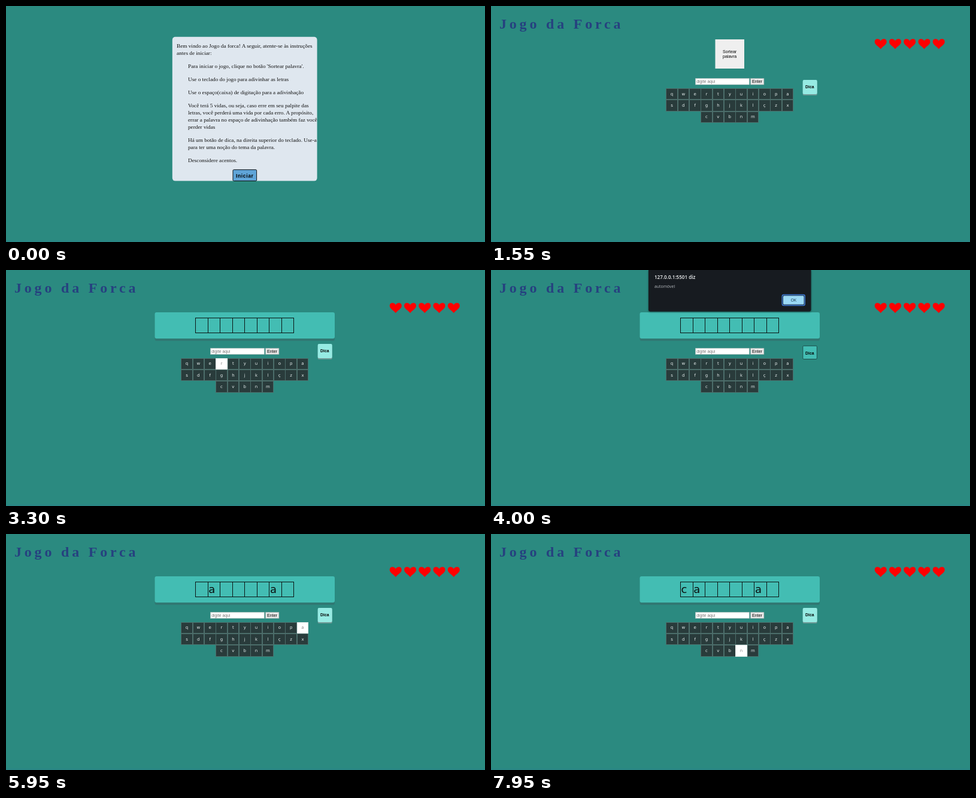
These frames come from a looping animation (800x396 px, 8000 ms). An HTML page:

```html
<!DOCTYPE html>
<html lang="pt">
<head>
<meta charset="utf-8">
<title>Jogo da Forca</title>
<style>
html, body { margin: 0; width: 100%; height: 100%; overflow: hidden; background: #2b8a80; }
svg { display: block; width: 800px; height: 396px; }
text { white-space: pre; }
.serif { font-family: "Liberation Serif", serif; }
.sans { font-family: "Liberation Sans", sans-serif; }
.wide { font-family: "DejaVu Sans", sans-serif; }
.ui { font-family: "Open Sans", sans-serif; }
.mid { text-anchor: middle; }
.bold { font-weight: 700; }
.crisp, .key rect { shape-rendering: crispEdges; }
.key rect { fill: #293b3b; stroke: #4c6d6a; stroke-width: 1; }
.key text { fill: #e6eeee; font-size: 7px; }
.key.on rect { fill: #fff; stroke: #e4e8e8; }
.key.on text { fill: #8a8a8a; }
</style>
</head>
<body>
<svg id="stage" viewBox="0 0 800 396" xmlns="http://www.w3.org/2000/svg"></svg>
<script>
const LOOP = 8000;
const stage = document.getElementById('stage');

function add(parent, tag, attrs, content) {
  const el = document.createElementNS('http://www.w3.org/2000/svg', tag);
  for (const name in attrs) el.setAttribute(name, attrs[name]);
  if (content) el.textContent = content;
  parent.appendChild(el);
  return el;
}
const group = (parent, attrs) => add(parent, 'g', attrs);
const box = (parent, x, y, width, height, fill, extra) =>
  add(parent, 'rect', { x, y, width, height, fill, ...extra });
const label = (parent, x, y, size, cls, content, extra) =>
  add(parent, 'text', { x, y, 'font-size': size, class: cls, ...extra }, content);
const show = (el, on) => el.setAttribute('display', on ? 'inline' : 'none');

box(stage, 0, 0, 800, 396, '#2b8a80');
box(stage, 0, 393, 800, 3, '#2a8785');

// Instructions card
const intro = group(stage);
box(intro, 277.8, 51.8, 241.8, 241.8, '#dfe7ef', { rx: 5 });
[
  [285, 70.3, 'Bem vindo ao Jogo da forca! A seguir, atente-se às instruções'],
  [285, 82.3, 'antes de iniciar:'],
  [304, 104, "Para iniciar o jogo, clique no botão 'Sortear palavra'."],
  [304, 126, 'Use o teclado do jogo para adivinhar as letras'],
  [304, 148, 'Use o espaço(caixa) de digitação para a adivinhação'],
  [304, 169.8, 'Você terá 5 vidas, ou seja, caso erre em seu palpite das'],
  [304, 181.8, 'letras, você perderá uma vida por cada erro. A propósito,'],
  [304, 193.8, 'errar a palavra no espaço de adivinhação também faz você'],
  [304, 205.8, 'perder vidas'],
  [304, 227.8, 'Há um botão de dica, na direita superior do teclado. Use-a'],
  [304, 239.8, 'para ter uma noção do tema da palavra.'],
  [304, 261.8, 'Desconsidere acentos.']
].forEach(([x, y, line]) => label(intro, x, y, 9.24, 'serif', line, { fill: '#111' }));
box(intro, 379, 274.7, 39.6, 18.8, '#5fa4d8', { rx: 1.5, stroke: '#111' });
label(intro, 384, 287.8, 8.6, 'sans bold', 'Iniciar', { 'letter-spacing': .6 });

// Game screen
const game = group(stage);
label(game, 14, 38, 24, 'serif bold', 'Jogo da Forca', { fill: '#26417f', 'letter-spacing': 4.8 });
for (let i = 0; i < 5; i++) {
  add(game, 'path', {
    transform: `translate(${650.8 + i * 24.25} 55)`, fill: '#f00',
    d: 'M0 17.2C-3 13-10 10-10 5.2C-10 1.6-7.6 .3-5.4 .3C-2.8 .3-.8 1.8 0 3.8' +
       'C.8 1.8 2.8 .3 5.4 .3C7.6 .3 10 1.6 10 5.2C10 10 3 13 0 17.2Z'
  });
}

const draw = group(game);
box(draw, 374.5, 56, 48.5, 49, '#efefef');
label(draw, 398.6, 79, 7.1, 'sans mid', 'Sortear');
label(draw, 398.6, 87.4, 7.1, 'sans mid', 'palavra');

const panel = group(game);
box(panel, 248.5, 75, 300.5, 44, '#307873', { rx: 3 });
box(panel, 248.5, 71, 300.5, 44, '#43bdb3', { rx: 3 });
const CELL = 20.55;
for (let i = 0; i < 8; i++) {
  box(panel, 316.5 + i * CELL, 80.5, CELL, 24.5, 'none', { stroke: '#0a1514', class: 'crisp' });
}
const letter = (i, ch) => label(panel, 317.6 + i * CELL, 99, 18, 'wide', ch, { fill: '#0a0f0f' });
const found = [
  { at: 5900, el: letter(1, 'a') },
  { at: 5900, el: letter(6, 'a') },
  { at: 6650, el: letter(0, 'c') }
];

// Input row and keyboard
const board = group(game);
box(board, 341.5, 121.5, 90, 10.5, '#fff', { stroke: '#a3b3b0', 'stroke-width': .6 });
label(board, 343.3, 129.2, 6.8, 'sans', 'digite aqui', { fill: '#757575' });
box(board, 433.3, 121.5, 22.6, 10.5, '#e8e8e8', { stroke: '#9aa8a5', 'stroke-width': .6 });
label(board, 444.5, 129.3, 7.1, 'sans mid', 'Enter');

const KEY = 19.35;
const keys = {};
['qwertyuiopa', 'sdfghjklçzx', 'cvbnm'].forEach((row, r) => {
  [...row].forEach((ch, c) => {
    const x = 292.5 + (c + (r === 2 ? 3 : 0)) * KEY;
    const y = 138 + r * KEY;
    const key = keys[ch] = group(board, { class: 'key' });
    box(key, x + .3, y + .3, KEY - .8, KEY - .8);
    label(key, x + KEY / 2 - .2, y + 11.7, 7, 'wide mid', ch);
  });
});

// Hint button, idle and pressed
const hint = group(game);
box(hint, 520.7, 126, 24, 24, '#6f9a97', { rx: 2 });
box(hint, 520.7, 124, 24, 24, '#96ebe3', { rx: 2 });
label(hint, 532.3, 138.4, 6.8, 'sans bold mid', 'Dica');
const pressed = group(game);
box(pressed, 520.8, 127.3, 23.6, 22.2, '#43bdb3', { rx: 1.5, stroke: '#1d4d4a', 'stroke-width': 1 });
label(pressed, 532.3, 141.8, 6.8, 'sans bold mid', 'Dica');

// Browser dialog
const dialog = group(game, { style: 'filter: drop-shadow(0 1px 1.5px rgba(0,0,0,.45))' });
add(dialog, 'path', { d: 'M263 0H534.5V66.5Q534.5 69.5 531.5 69.5H266Q263 69.5 263 66.5Z', fill: '#171b20' });
label(dialog, 273, 15, 8.1, 'ui', '127.0.0.1:5501 diz', { fill: '#f2f4f5', 'font-weight': 600 });
label(dialog, 273, 30, 6.9, 'ui', 'automóvel', { fill: '#b4b9bd' });
box(dialog, 486.4, 41.6, 37.8, 17.8, '#171b20', { rx: 2.5, stroke: '#3c78d0', 'stroke-width': 1.6 });
box(dialog, 488, 43.2, 34.6, 14.6, '#9bd9f6', { rx: 1.5 });
label(dialog, 505.3, 53, 7, 'ui mid', 'OK', { fill: '#12324a' });

// Key under the pointer from each time on
const hovers = [
  [0, ''], [3300, 'r'], [3350, 'g'], [3650, 'k'], [3700, ''],
  [5350, 'a'], [6300, 'ç'], [6350, 'k'], [6400, 'g'], [6450, 'c'],
  [7900, 'h'], [7950, 'n']
];

function render(t) {
  const started = t >= 1200;
  const drawn = t >= 2750;
  const asking = t >= 3950 && t < 4650;
  show(intro, !started);
  show(game, started);
  show(draw, !drawn);
  show(panel, drawn);
  show(dialog, asking);
  show(pressed, asking);
  show(hint, !asking);
  board.setAttribute('transform', `translate(0 ${drawn ? 9.7 : 0})`);
  found.forEach(f => show(f.el, t >= f.at));
  const over = hovers.filter(h => h[0] <= t).pop()[1];
  for (const ch in keys) keys[ch].classList.toggle('on', ch === over);
}

const start = performance.now();
function tick() {
  render((performance.now() - start) % LOOP);
  requestAnimationFrame(tick);
}
render(0);
requestAnimationFrame(tick);
</script>
</body>
</html>
```
